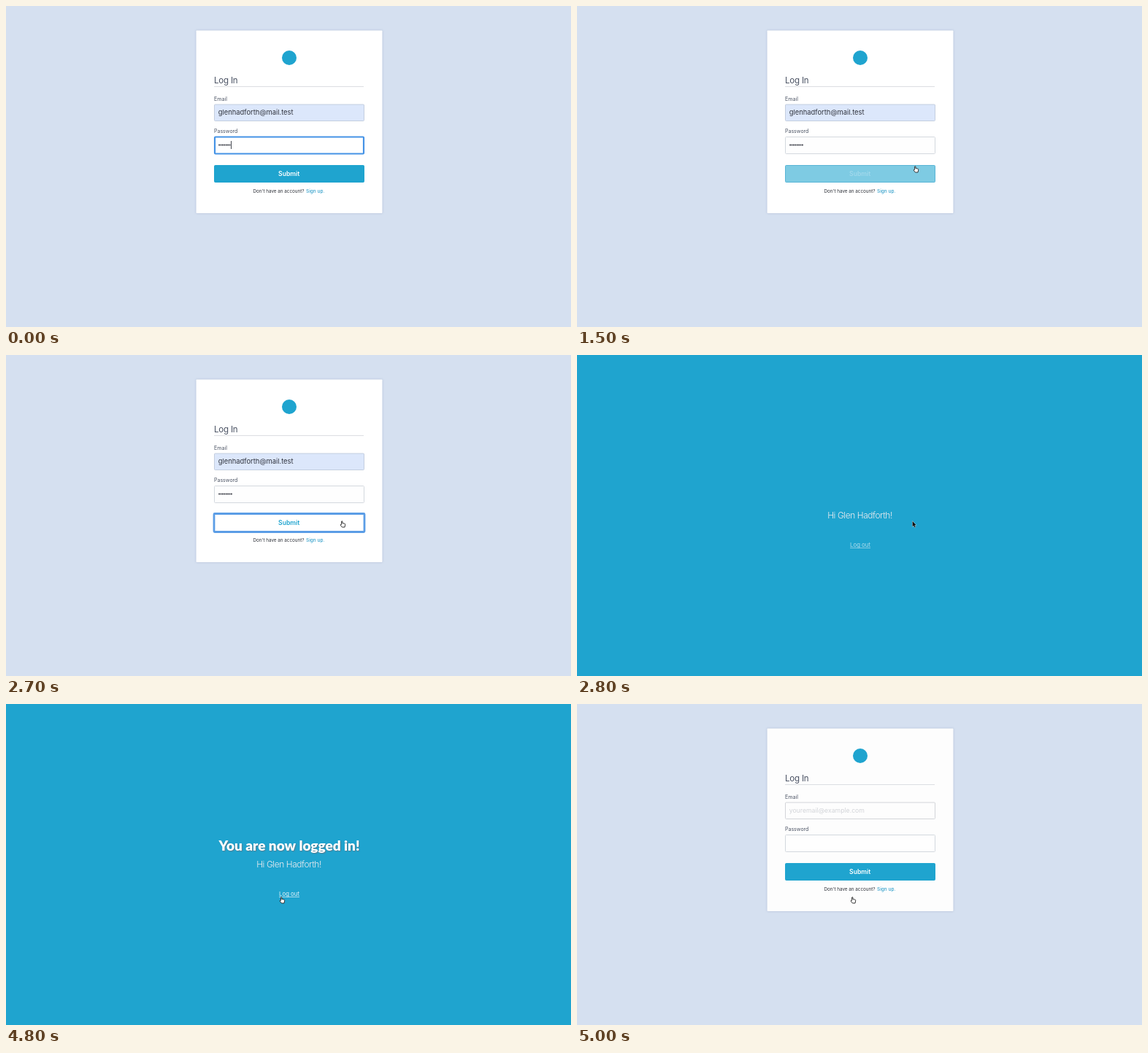
An HTML page with a canvas for the animation above (5100 ms loop, 774 by 440 pixels).

```html
<!DOCTYPE html>
<html lang="en">
<head>
<meta charset="utf-8">
<title>Log in demo</title>
<style>
  html, body { margin: 0; width: 100%; height: 100%; overflow: hidden; }
  canvas { display: block; }
</style>
</head>
<body>
<canvas id="stage" width="774" height="440"></canvas>
<script>
const ctx = document.getElementById('stage').getContext('2d');
const LOOP = 5100, STEP = 100;
const TEAL = '#1fa4cf', INK = '#4a5263';
const LOGIN_AT = 2800, HEADING_AT = 2900, LOGOUT_AT = 4900;

// Pointer path: time, x, y of the tip
const path = [
  [500, 482, 244], [700, 490, 238], [900, 510, 191], [1000, 510, 191],
  [1200, 483, 207], [1400, 467, 219], [1500, 462, 219], [1700, 459, 227],
  [3600, 459, 227], [4100, 390, 259], [4300, 376, 264], [5100, 376, 264]
];
const arrow = new Path2D('M.6 .8V8.2L2.3 6.7L3.5 9.4L4.7 8.9L3.5 6.2H5.7Z');
const hand = new Path2D('M.6 5.3V1Q1.2 0 1.9 1V3.5L4.8 4.1Q5.9 4.4 5.7 5.5L5 9H1.4L-.8 6.2Q-1.2 4.9 .6 5.3Z');

const lerp = (a, b, k) => a + (b - a) * k;
const clamp = k => Math.max(0, Math.min(1, k));
const mix = (a, b, k) => `rgb(${a.map((v, i) => Math.round(lerp(v, b[i], k)))})`;

function text(str, x, y, size, color, { weight = 400, family = 'Inter', align = 'left', spacing = 0 } = {}) {
  ctx.font = `${weight} ${size}px ${family}, sans-serif`;
  ctx.textAlign = align;
  ctx.letterSpacing = spacing + 'px';
  ctx.fillStyle = color;
  ctx.fillText(str, x, y);
}

function box(x, y, w, h, fill, stroke, line = 1) {
  ctx.beginPath();
  ctx.roundRect(x, y, w, h, 1);
  ctx.fillStyle = fill;
  ctx.fill();
  if (!stroke) return;
  ctx.strokeStyle = stroke;
  ctx.lineWidth = line;
  ctx.stroke();
}

function shadow(color, blur, offset = 0) {
  ctx.shadowColor = color;
  ctx.shadowBlur = blur;
  ctx.shadowOffsetX = ctx.shadowOffsetY = offset;
}

function drawPassword(t, empty) {
  const focused = !empty && t < 900;
  if (focused) box(286, 179.5, 204, 23, '#fff', '#4593e6', 2.2);
  else box(285.5, 179.5, 205, 23, '#fefefe', '#d3d8de');
  if (empty) return;

  const count = t < 200 ? 7 : 8;
  ctx.fillStyle = '#30333d';
  for (let i = 0; i < count; i++) {
    ctx.beginPath();
    ctx.arc(292.1 + i * 2.4, 190.6, 1, 0, 7);
    ctx.fill();
  }
  if (focused) ctx.fillRect(291.2 + count * 2.4, 185, 0.9, 11);
}

function drawSubmit(t, empty) {
  const hover = empty ? 0 : clamp((t - 1360) / 330);
  const teal = [31, 164, 207], white = [255, 255, 255];
  const pressed = !empty && t >= 2200;
  box(285.5, 218.5, 205, 23, mix(teal, white, hover), hover ? '#58b5d6' : TEAL);
  if (pressed) box(285, 217.5, 206, 25, '#fff', '#5b9de6', 2.8);
  text('Submit', 387.7, 232.7, 8.6, mix(white, teal, hover), { weight: 600, align: 'center' });
}

function drawForm(t, empty) {
  ctx.fillStyle = '#d5e0f0';
  ctx.fillRect(0, 0, 774, 440);
  shadow('rgba(100,120,160,.35)', 3);
  box(260.5, 33.5, 255, 250.5, empty ? '#fdfdfd' : '#fff');
  shadow('transparent', 0);

  ctx.beginPath();
  ctx.arc(388, 71, 10, 0, 7);
  ctx.fillStyle = TEAL;
  ctx.fill();

  text('Log In', 285, 105.5, 11.5, INK, { spacing: -0.2 });
  ctx.fillStyle = '#dcdee2';
  ctx.fillRect(285, 110, 205, 1);

  text('Email', 285, 129.5, 7.1, INK);
  box(285.5, 135, 205, 22.5, empty ? '#fdfdfd' : '#dce7fb', empty ? '#d3d5d9' : '#c4cfdf');
  if (empty) text('youremail@example.com', 290.7, 149, 8.7, '#d2d4d8');
  else text('glenhadforth@mail.test', 290.7, 149.2, 9.4, '#30333d');

  text('Password', 285, 174, 7, INK);
  drawPassword(t, empty);
  drawSubmit(t, empty);
  text("Don't have an account?", 338.5, 256.3, 6.3, '#2d3038');
  text('Sign up.', 411, 256.3, 6.5, '#329fca', { weight: 500 });
}

function drawWelcome(t) {
  ctx.fillStyle = TEAL;
  ctx.fillRect(0, 0, 774, 440);
  if (t >= HEADING_AT) {
    shadow('rgba(110,110,120,.7)', 1.2, 0.9);
    text('You are now logged in!', 388, 200.7, 19, '#fff', { weight: 900, family: 'Lato', align: 'center' });
    shadow('transparent', 0);
  }
  text('Hi Glen Hadforth!', 387.5, 224, 11.9, '#f1eef0', { weight: 350, align: 'center', spacing: -0.4 });

  const color = t >= 4200 ? '#e6f4f9' : '#b0dded';
  text('Log out', 388, 263.3, 7.8, color, { align: 'center' });
  ctx.fillRect(374, 264.3, 28, 0.7);
}

function drawPointer(t) {
  if (t < path[0][0]) return;
  const i = path.findIndex(p => p[0] > t);
  const [t0, x0, y0] = path[i - 1], [t1, x1, y1] = path[i];
  const k = (t - t0) / (t1 - t0);
  const isHand = (t >= 1400 && t < LOGIN_AT) || t >= 4200;
  const shape = isHand ? hand : arrow;

  ctx.save();
  ctx.translate(lerp(x0, x1, k), lerp(y0, y1, k));
  ctx.lineJoin = 'round';
  ctx.lineWidth = 0.9;
  ctx.strokeStyle = isHand ? '#222' : '#cfe6ee';
  ctx.fillStyle = isHand ? '#fff' : '#111';
  if (isHand) ctx.fill(shape);
  ctx.stroke(shape);
  if (!isHand) ctx.fill(shape);
  ctx.restore();
}

function frame() {
  const t = Math.floor(performance.now() % LOOP / STEP) * STEP;
  if (t >= LOGIN_AT && t < LOGOUT_AT) drawWelcome(t);
  else drawForm(t, t >= LOGOUT_AT);
  drawPointer(t);
  requestAnimationFrame(frame);
}
frame();
</script>
</body>
</html>
```
